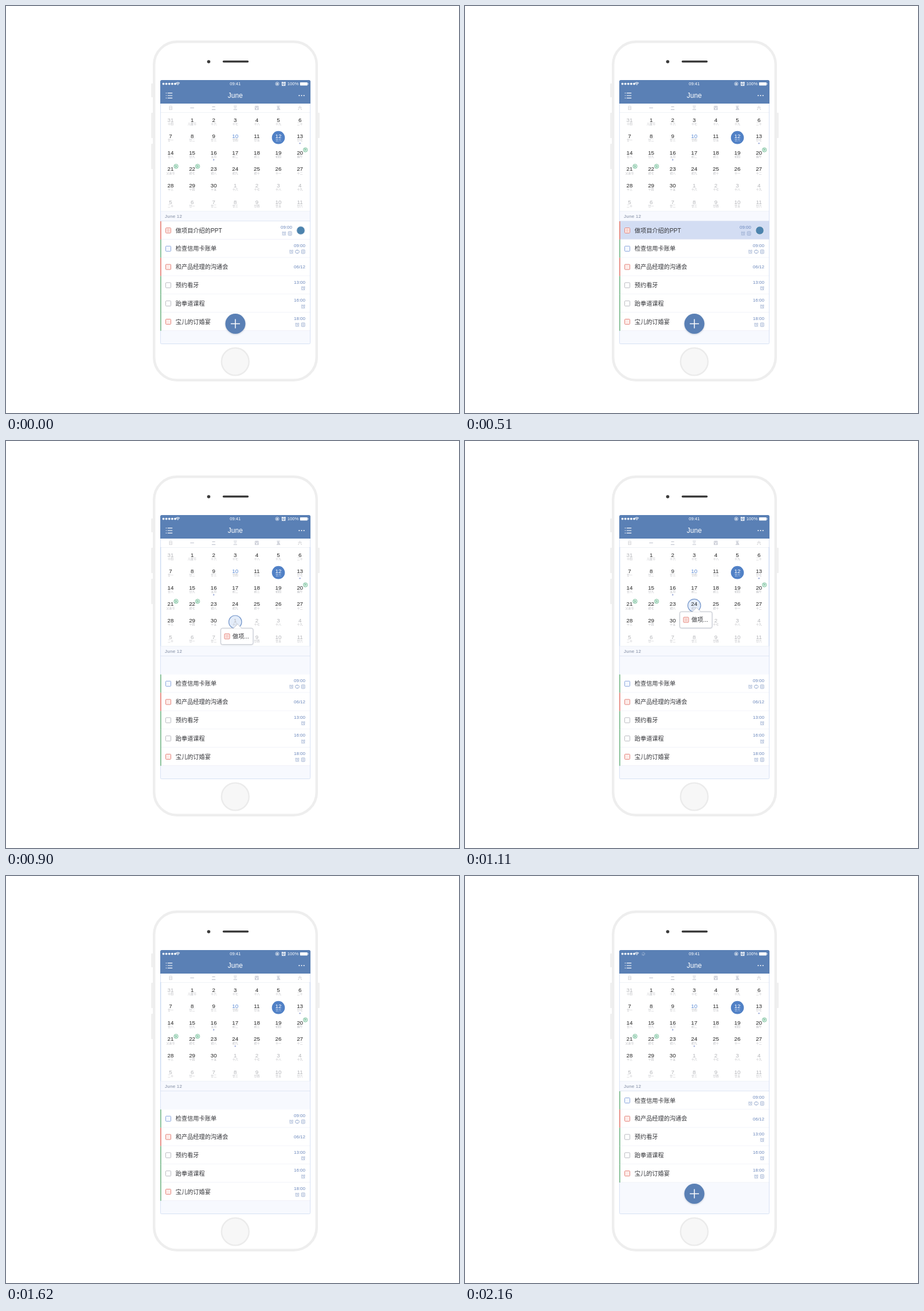
These frames come from a looping animation (790 by 709 pixels, 2190 ms). An HTML page with a canvas:

```html
<!DOCTYPE html>
<html lang="zh-CN">
<head>
<meta charset="utf-8">
<style>
html, body { margin: 0; height: 100%; overflow: hidden; background: #fff; }
canvas { display: block; }
</style>
</head>
<body>
<canvas id="stage" width="790" height="709"></canvas>
<script>
const g = document.getElementById('stage').getContext('2d');
const LOOP = 2190, ROW = 31.8, LIST = 375, CELL = 28.65;
const BLUE = '#5a80b5', PALE = '#f7f9fe', RED = '#e5847b', GREEN = '#7dbb8e', INK = '#333438', TIME = '#6986bb';

const ramp = (t, a, b) => Math.min(1, Math.max(0, (t - a) / (b - a)));
const ease = (t, a, b) => { const p = ramp(t, a, b); return p * p * (3 - 2 * p); };
const mix = (a, b, p) => a + (b - a) * p;

// piecewise linear value through [time, value] points
function along(t, points) {
  let v = points[0][1];
  for (let i = 1; i < points.length; i++) {
    const [a, from] = points[i - 1], [b, to] = points[i];
    if (t >= a) v = mix(from, to, ramp(t, a, b));
  }
  return v;
}

function text(s, x, y, size, color, align = 'left', spacing = 0) {
  g.font = `${size}px "Liberation Sans", "Noto Sans CJK SC", "Noto Sans CJK", sans-serif`;
  g.letterSpacing = spacing + 'px';
  g.textAlign = align;
  g.fillStyle = color;
  g.fillText(s, x, y + size * 0.36);
}
function paint(fill, stroke, width = 1) {
  if (fill) { g.fillStyle = fill; g.fill(); }
  if (stroke) { g.strokeStyle = stroke; g.lineWidth = width; g.stroke(); }
}
function box(x, y, w, h, r, fill, stroke, width) {
  g.beginPath(); g.roundRect(x, y, w, h, r); paint(fill, stroke, width);
}
function dot(x, y, r, fill, stroke, width) {
  g.beginPath(); g.arc(x, y, r, 0, 7); paint(fill, stroke, width);
}
function path(points, color, width = 1) {
  g.beginPath();
  points.forEach(([x, y]) => g.lineTo(x, y));
  paint(null, color, width);
}
const hline = (x1, x2, y, color, width) => path([[x1, y], [x2, y]], color, width);

function alarm(x, y, color = '#8da2c9', w = 0.8) {
  dot(x, y + 0.3, 2.7, null, color, w);
  path([[x, y - 1.3], [x, y + 0.6], [x + 1.3, y + 0.6]], color, w);
  path([[x - 3.5, y - 1.8], [x - 1.8, y - 3.3]], color, w);
  path([[x + 3.5, y - 1.8], [x + 1.8, y - 3.3]], color, w);
  path([[x - 2, y + 2.5], [x - 3, y + 3.5]], color, w);
  path([[x + 2, y + 2.5], [x + 3, y + 3.5]], color, w);
}
function note(x, y) {
  box(x - 2.9, y - 3.2, 5.8, 6.4, 0.8, null, '#8da2c9', 0.8);
  for (const d of [-1.4, 0, 1.4]) hline(x - 1.5, x + 1.5, y + d, '#8da2c9', 0.6);
}
function repeat(x, y) {
  box(x - 3.5, y - 2.6, 7, 5.2, 2.6, null, '#8da2c9', 0.8);
  path([[x - 0.6, y - 3.6], [x + 0.6, y - 2.6], [x - 0.6, y - 1.6]], '#8da2c9', 0.7);
  path([[x + 0.6, y + 3.6], [x - 0.6, y + 2.6], [x + 0.6, y + 1.6]], '#8da2c9', 0.7);
}
const ICONS = { a: alarm, r: repeat, n: note };
const CHECKS = { red: [RED, '#fdebe8'], blue: ['#8aa6dc', '#f4f8ff'], gray: ['#b9bbc0', '#fff'] };

function check(x, y, kind, lined) {
  const [edge, fill] = CHECKS[kind];
  box(x - 4.5, y - 4.5, 9, 9, 1, fill, edge, 1);
  if (lined) for (const d of [-1.8, 0, 1.8]) hline(x - 2.4, x + 2.4, y + d, '#eda69f', 0.7);
}

function drawPhone() {
  for (const [x, y, h] of [[253, 135, 24], [253, 186, 44], [253, 240, 44], [543, 186, 44]])
    box(x, y, 4, h, 1, '#f0f0f0');
  box(258.2, 62.3, 283.6, 589.4, 40, '#fff', '#eeeeee', 4.5);
  dot(353.5, 97, 2.8, '#3b3b3b');
  g.lineCap = 'round';
  hline(379.5, 421.5, 96.8, '#3b3b3b', 3.4);
  g.lineCap = 'butt';
  dot(399.8, 619.5, 23.9, '#f7f7f7', '#ebebeb', 2.4);
}

function drawHeader(t) {
  box(269, 129, 262, 41, [2, 2, 0, 0], BLUE);
  for (let i = 0; i < 5; i++) dot(274.6 + i * 5.1, 135.6, 1.9, '#fff');
  for (const r of [1.2, 3.1, 5]) {
    g.beginPath(); g.arc(299.6, 138.2, r, -2.3, -0.84); paint(null, '#fff', 1.1);
  }
  if (t >= 1710) {
    const lead = Math.floor(t / 60);
    for (let i = 0; i < 8; i++) {
      const a = i * Math.PI / 4, c = Math.cos(a), s = Math.sin(a);
      const alpha = 0.3 + 0.6 * ((i - lead + 800) % 8) / 7;
      path([[311 + c * 1.5, 135.5 + s * 1.5], [311 + c * 3.2, 135.5 + s * 3.2]], `rgba(255,255,255,${alpha})`, 0.8);
    }
  }
  text('09:41', 399.8, 135.7, 7.6, '#fff', 'center');
  dot(473, 135.6, 3, null, '#fff', 0.7);
  box(471.7, 135, 2.6, 2, 0.3, '#fff');
  dot(473, 134.9, 0.9, null, '#fff', 0.5);
  alarm(484.2, 135.6, '#fff', 1.2);
  text('100%', 490.8, 135.7, 7.6, '#fff');
  box(512.8, 132.9, 13, 5.6, 0.8, '#fff');
  box(526.4, 134.6, 1, 2.2, 0.5, '#fff');

  for (const y of [151.7, 156, 160.3]) {
    box(278.8, y - 0.6, 1.3, 1.2, 0, '#fff');
    hline(281.8, 290.2, y, '#fff', 1.2);
  }
  text('June', 399.8, 156, 12, '#fff', 'center');
  for (const x of [511.3, 515.5, 519.7]) dot(x, 156, 1, '#fff');
}

const FEASTS = { 1: '儿童节', 16: '五月', 20: '端午', 21: '父亲节' };
function lunar(k) {
  if (FEASTS[k]) return FEASTS[k];
  const d = k < 16 ? k + 14 : k - 15;
  if (d === 10) return '初十';
  if (d === 20) return '二十';
  return '初十廿'[Math.floor(d / 10)] + '十一二三四五六七八九'[d % 10];
}

function drawCalendar(t, target) {
  const colX = i => 287 + i * 37.6;
  [...'日一二三四五六'].forEach((c, i) =>
    text(c, colX(i), 177.3, 7.2, i % 6 ? '#8d93a8' : '#b4b5ba', 'center'));
  hline(269, 531, 185.5, '#f0f2f7', 1);
  if (target >= 0) dot(399.8, 200.6 + target * CELL, 11.2, '#e3ecf9', '#7093c9', 1.2);

  for (let k = 0; k < 42; k++) {
    const x = colX(k % 7), y = 198 + Math.floor(k / 7) * CELL;
    const outside = k < 1 || k > 30, chosen = k === 12;
    if (chosen) dot(x, y + 2.5, 11.3, '#5181c6');
    const color = chosen ? '#fff' : outside ? '#b3b4b8' : k === 10 ? '#5a8ad4' : '#222';
    text(k < 1 ? 31 : k > 30 ? k - 30 : k, x, y, 9.8, color, 'center');
    text(lunar(k), x, y + 6.9, 5, chosen ? '#d8e4f6' : '#b7b8bd', 'center');
    if (k === 13 || k === 16 || (k === 24 && t >= 1600)) dot(x, y + 12.6, 1.3, '#a5b2dc');
    if (k > 19 && k < 23) {
      dot(x + 9.5, y - 4.7, 3.7, '#eefaf3', '#63b48c', 0.8);
      text('休', x + 9.5, y - 4.7, 4.8, '#4ba67a', 'center');
    }
  }
  if (t >= 770 && t < 1710)
    for (const x of [269.6, 530.4]) path([[x, 185], [x, 357]], '#a6c0ec', 1.2);
}

const TASKS = [
  { name: '做项目介绍的PPT', bar: RED, check: 'red', time: '09:00', icons: 'an', face: true },
  { name: '检查信用卡账单', bar: GREEN, check: 'blue', time: '09:00', icons: 'arn' },
  { name: '和产品经理的沟通会', bar: RED, check: 'red', time: '06/12', icons: '' },
  { name: '预约看牙', bar: GREEN, check: 'gray', time: '13:00', icons: 'a' },
  { name: '跆拳道课程', bar: GREEN, check: 'gray', time: '16:00', icons: 'a' },
  { name: '宝儿的订婚宴', bar: GREEN, check: 'red', time: '18:00', icons: 'an' }
];

function drawTask(task, y, glow = 0) {
  const cy = y + 16, right = task.face ? 499 : 522;
  box(269, y, 262, ROW, 0, '#fff');
  if (glow) box(269, y, 262, ROW, 0, `rgba(211,221,243,${glow})`);
  hline(271, 531, y + ROW - 0.4, '#eceff6', 0.8);
  box(269, y, 1.5, ROW, 0, task.bar);
  check(283, cy, task.check, task.face);
  text(task.name, 295.8, cy, 10.2, INK);
  text(task.time, right, task.icons ? cy - 5.6 : cy, 8, TIME, 'right');
  [...task.icons].reverse().forEach((c, i) => ICONS[c](right - 3.8 - i * 10.3, cy + 5.2));
  if (task.face) dot(514, cy, 7.2, '#4c83ad', '#dfe5ee', 1);
}

function drawList(t) {
  box(269, 357, 262, 232, 0, PALE);
  hline(269, 531, 357.4, '#edf1f8', 0.8);
  text('June 12', 277, 366.3, 8, '#7c879e', 'left', 0.25);
  hline(269, 531, 374.5, '#e0e7f4', 1);
  const up = ROW * ease(t, 1700, 1840);
  for (let i = 1; i < TASKS.length; i++) drawTask(TASKS[i], LIST + i * ROW - up);
  if (t < 570) drawTask(TASKS[0], LIST, ease(t, 60, 330));
}

function shadow(alpha, blur, dy) {
  g.shadowColor = `rgba(70,85,120,${alpha})`;
  g.shadowBlur = blur;
  g.shadowOffsetY = dy;
}

function drawPlus(t) {
  const rise = t < 1000 ? 1 - ramp(t, 570, 680) : ramp(t, 1830, 2010);
  if (!rise) return;
  const x = 400, y = mix(607, 553.5, rise);
  g.save();
  g.globalAlpha = 0.5 + 0.5 * rise;
  g.save();
  shadow(0.3, 3, 1);
  dot(x, y, 17.5, BLUE);
  g.restore();
  hline(x - 8, x + 8, y, '#fff', 1.5);
  path([[x, y - 8], [x, y + 8]], '#fff', 1.5);
  g.restore();
}

// the row while held, shrinking into a small bubble
function drawDragged(t, cy, morph) {
  if (t < 570 || t >= 1620) return;
  g.save();
  if (!morph) {
    const y = cy - 16;
    g.save();
    shadow(0.35 * ramp(t, 570, 660), 5, 1);
    box(269, y, 262, ROW, 0, '#fff');
    g.restore();
    drawTask(TASKS[0], y, 1 - ramp(t, 570, 660));
  } else {
    const p = ramp(t, 1380, 1620), s = 1 - 0.85 * p * p;
    g.globalAlpha = 1 - ramp(t, 1500, 1620);
    g.translate(431, 258); g.scale(s, s); g.translate(-431, -258);
    const x = mix(269, 374.5, morph), w = mix(262, 56.5, morph);
    const h = mix(ROW, 28.5, morph), y = cy - h / 2, tip = 7 * morph, ax = x + w * 0.52;
    g.save();
    shadow(0.2, 2, 0.5);
    box(x, y, w, h, 3 * morph, '#fff', '#c6c9d0', 0.9);
    g.restore();
    g.beginPath();
    g.moveTo(ax - tip, y + 0.6); g.lineTo(ax, y - tip); g.lineTo(ax + tip, y + 0.6);
    g.fillStyle = '#fff'; g.fill();
    path([[ax - tip, y], [ax, y - tip], [ax + tip, y]], '#c6c9d0', 0.9);
    check(x + 11, cy, 'red', true);
    text('做项...', x + 20.5, cy, 10.2, INK);
  }
  g.restore();
}

function frame(now) {
  const t = now % LOOP;
  const cy = along(t, [[570, 391], [690, 385], [780, 369], [900, 340.5], [1090, 311.5]]);
  const morph = ease(t, 715, 790);
  const target = morph === 1 && t < 1600 ? Math.round((cy - 311.5) / CELL) + 3 : -1;

  g.fillStyle = '#fff';
  g.fillRect(0, 0, 790, 709);
  drawPhone();
  g.save();
  g.beginPath(); g.roundRect(269, 129, 262, 460, 2); g.clip();
  g.fillStyle = '#fff';
  g.fillRect(269, 129, 262, 460);
  drawCalendar(t, target);
  drawList(t);
  box(269.4, 168, 261.2, 420.6, 2, null, '#d0dcf2', 0.9);
  for (let i = 0; i < TASKS.length; i++) {
    if (i === 0 && t >= 570) continue;
    const up = ROW * ease(t, 1700, 1840);
    box(269, LIST + i * ROW - (i ? up : 0), 1.5, ROW, 0, TASKS[i].bar);
  }
  drawHeader(t);
  drawDragged(t, cy, morph);
  drawPlus(t);
  g.restore();
}

const start = performance.now();
(function tick() {
  frame(performance.now() - start);
  requestAnimationFrame(tick);
})();
</script>
</body>
</html>
```
